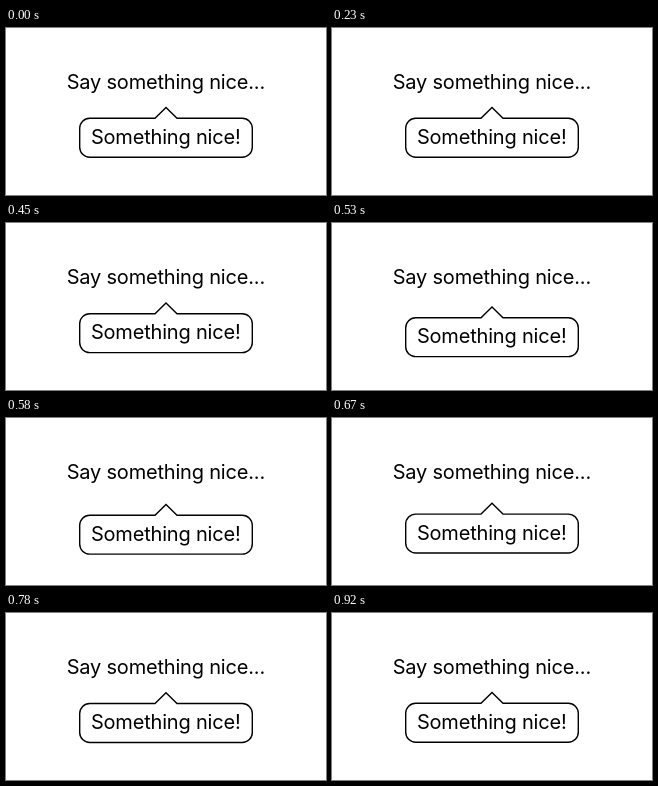
Recreate the animation shown at these times as an HTML page. Size 320 by 167 pixels, loop 0.98 s.

```html
<!DOCTYPE html>
<html lang="en">
<meta charset="utf-8">
<title>Tooltip</title>
<style>
  html, body { margin: 0; width: 100%; height: 100%; overflow: hidden; background: #fff; }
  svg { display: block; width: 100%; height: 100%; }
  text { font: 20px Inter, "Liberation Sans", sans-serif; letter-spacing: -.19px; text-anchor: middle; }
  path { fill: #fff; stroke: #000; stroke-width: 1.4; }
</style>
<svg viewBox="0 0 320 167">
  <text x="159.8" y="61">Say something nice...</text>
  <g id="bubble">
    <path d="M83.7 90.3H149L160 79.5L171 90.3H236.3A10 10 0 0 1 246.3 100.3V119.2A10 10 0 0 1 236.3 129.2H83.7A10 10 0 0 1 73.7 119.2V100.3A10 10 0 0 1 83.7 90.3Z"/>
    <text x="159.7" y="116">Something nice!</text>
  </g>
</svg>
<script>
  const LOOP = 980, PEAK = 612, WIDTH = 107, DROP = 7.2;
  const bubble = document.getElementById('bubble');
  const start = performance.now();

  // The bubble dips smoothly around PEAK and rests for the remainder of the loop.
  function draw() {
    const t = (performance.now() - start) % LOOP;
    const y = DROP * Math.exp(-((Math.abs(t - PEAK) / WIDTH) ** 2.6));
    bubble.setAttribute('transform', `translate(0 ${y.toFixed(2)})`);
    requestAnimationFrame(draw);
  }
  draw();
</script>
</html>
```
